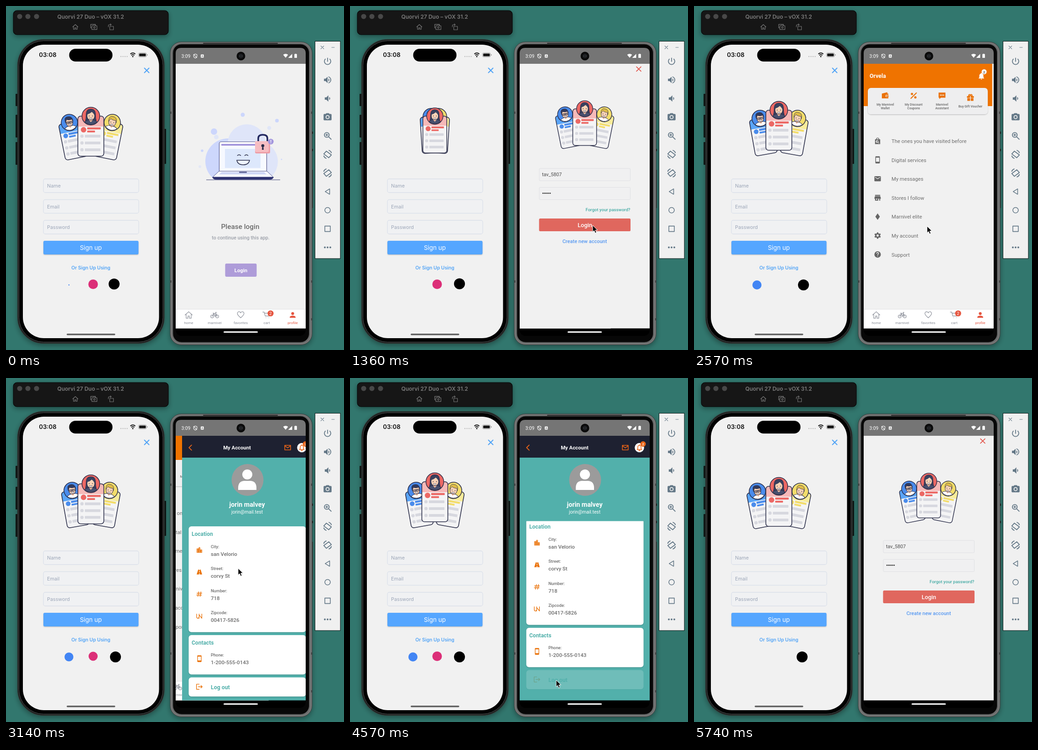
Recreate the animation shown at these times as an HTML page. Size 741x756 px, loop 5850 ms.

```html
<!DOCTYPE html>
<html lang="en">
<head>
<meta charset="utf-8">
<title>Two phones</title>
<style>
html, body { margin: 0; width: 100%; height: 100%; overflow: hidden; background: #32776e; }
svg { display: block; width: 741px; height: 756px; }
text { font-family: Roboto, sans-serif; }
.ios text { font-family: Inter, sans-serif; }
</style>
</head>
<body>
<svg id="stage" viewBox="0 0 741 756"></svg>
<script>
const LOOP = 5850, W = 285;
const NAVY = '#2b2e49', ORANGE = '#ea7209', TEAL = '#52b0ab', RED = '#e5553f', SLATE = '#647887';

// Icons on a 24 x 24 grid
const FILLED = {
  power: 'M13 3h-2v10h2zM17.8 5.2l-1.4 1.4A7 7 0 1 1 7.6 6.6L6.2 5.2A9 9 0 1 0 17.8 5.2z',
  loud: 'M3 9v6h4l5 5V4L7 9zM16.5 12A4.5 4.5 0 0 0 14 8v8a4.5 4.5 0 0 0 2.5-4zM14 3.2v2.1a7 7 0 0 1 0 13.4v2.1a9 9 0 0 0 0-17.6z',
  quiet: 'M18.5 12A4.5 4.5 0 0 0 16 8v8a4.5 4.5 0 0 0 2.5-4zM5 9v6h4l5 5V4L9 9z',
  camera: 'M9 2L7.2 4H4a2 2 0 0 0-2 2v12a2 2 0 0 0 2 2h16a2 2 0 0 0 2-2V6a2 2 0 0 0-2-2h-3.2L15 2zM12 7a5 5 0 1 1 0 10a5 5 0 1 1 0-10zM12 9a3 3 0 1 0 0 6a3 3 0 1 0 0-6z',
  person: 'M12 12a4 4 0 1 0 0-8a4 4 0 0 0 0 8zM12 14c-2.7 0-8 1.3-8 4v2h16v-2c0-2.7-5.3-4-8-4z',
  bell: 'M12 22a2 2 0 0 0 2-2h-4a2 2 0 0 0 2 2zM18 16v-5c0-3-1.6-5.6-4.5-6.3V4a1.5 1.5 0 0 0-3 0v.7C7.6 5.4 6 8 6 11v5l-2 2v1h16v-1z',
  mail: 'M4 4a2 2 0 0 0-2 2v12a2 2 0 0 0 2 2h16a2 2 0 0 0 2-2V6a2 2 0 0 0-2-2zM20 8l-8 5-8-5V6l8 5 8-5z',
  help: 'M12 2a10 10 0 1 0 0 20a10 10 0 0 0 0-20zM13 19h-2v-2h2zM15 11.3c-1.5 1.5-2 2-2 3.7h-2c0-2.3.5-2.9 2.4-4.6A2 2 0 1 0 10 9H8a4 4 0 1 1 7 2.3z',
  phone: 'M7 1a2 2 0 0 0-2 2v18a2 2 0 0 0 2 2h10a2 2 0 0 0 2-2V3a2 2 0 0 0-2-2zM7 5h10v13H7z',
  diamond: 'M12 2L19 12L12 22L5 12z',
  store: 'M4 3h16v3H4zM4 7h16l2 6v2h-2v6h-3v-6h-3v6H4v-6H2v-2zM7 15v3h4v-3z',
  bag: 'M7 7a5 5 0 0 1 10 0h3v15H4V7zM9 7h6a3 3 0 0 0-6 0zM11 10a4 4 0 1 0 2 7l3 3 1-1-3-3a4 4 0 0 0-3-6zM11 12a2 2 0 1 1 0 4a2 2 0 0 1 0-4z',
  wallet: 'M2 6l16-4v4h3v4h-8v6h8v4H2zM14.5 11.5h7.5v3.5h-7.5z',
  chat: 'M2 3h20v15H9l-5 4v-4H2zM6 9v3h3V9zM10.5 9v3h3V9zM15 9v3h3V9z',
  gift: 'M2 8h4a4 4 0 0 1 6-5a4 4 0 0 1 6 5h4v5h-9V8h-2v5H2zM3 14h8v8H3zM13 14h8v8h-8zM8 6h3a1.5 1.5 0 0 0-3 0zM13 6h3a1.5 1.5 0 0 0-3 0z',
  city: 'M15 11V5l-3-3-3 3v2H3v14h18V11zM5 9h2v2H5zM5 13h2v2H5zM5 17h2v2H5zM11 5h2v2h-2zM11 9h2v2h-2zM11 13h2v2h-2zM11 17h2v2h-2zM17 13h2v2h-2zM17 17h2v2h-2z',
  road: 'M8 4h3v3h2V4h3l5 16h-8v-4h-2v4H3zM11 9v4h2V9z',
  exit: 'M17 7l-1.4 1.4 2.6 2.6H8v2h10.2l-2.6 2.6L17 17l5-5zM4 5h8V3H4a2 2 0 0 0-2 2v14a2 2 0 0 0 2 2h8v-2H4z',
  wifi: 'M12 21L.5 7C7 1.5 17 1.5 23.5 7z',
  signal: 'M2 22H22V2z',
  battery: 'M9 2h6v2h3v18H6V4h3z',
  gear: 'M10 2h4l.5 3 2.5 1.4 2.8-1 2 3.4L19.5 11v2l2.3 2.2-2 3.4-2.8-1-2.5 1.4-.5 3h-4l-.5-3L7 17.6l-2.8 1-2-3.4L4.5 13v-2L2.2 8.8l2-3.4 2.8 1L9.5 5zM12 8.5a3.5 3.5 0 1 0 0 7a3.5 3.5 0 0 0 0-7z'
};
const LINES = {
  home: 'M2 12L12 3l10 9M5 10v11h5v-6h4v6h5V10',
  bike: 'M9 16a4 4 0 1 1-8 0a4 4 0 1 1 8 0zM23 16a4 4 0 1 1-8 0a4 4 0 1 1 8 0zM5 16l4-7h7l3 7M9 9l4 7 3-7-2-4h3M7 7h4',
  heart: 'M12 20C7 15.5 3 12 3 8.5A4.5 4.5 0 0 1 12 6.5A4.5 4.5 0 0 1 21 8.5C21 12 17 15.5 12 20z',
  cart: 'M1 4h4l3 11h11l3-8H6M10 19.5h.1M18 19.5h.1',
  zoom: 'M16 10a6 6 0 1 1-12 0a6 6 0 1 1 12 0zM14.5 14.5L21 21M7.5 10h5M10 7.5v5',
  turn: 'M9 4L21.5 13.5L15 20.5L2.5 11zM15.5 2Q20 3.500 21.5 8M8.500 22Q4 20.5 2.5 16',
  back: 'M18 4v16L5 12z',
  round: 'M20 12a8 8 0 1 1-16 0a8 8 0 1 1 16 0z',
  square: 'M4 4h16v16H4z',
  cross: 'M5 5L19 19M19 5L5 19',
  dash: 'M4 12h16',
  chevron: 'M16 4l-8 8 8 8',
  letter: 'M3 5h18v14H3zM3 6l9 7 9-7',
  bellLine: 'M5 18h14l-2-3v-5a5 5 0 0 0-10 0v5zM10 21h4M12 3v2',
  hash: 'M10 4L7 20M17 4l-3 16M4 9h16M3 15h16',
  zip: 'M3 5v9q0 5 4 5t4-5V5M11 19V8l9 11V5',
  percent: 'M4 20L20 4M9 7a2 2 0 1 1-4 0a2 2 0 1 1 4 0zM19 17a2 2 0 1 1-4 0a2 2 0 1 1 4 0z',
  shots: 'M1 3h17v4M1 3v12h4M5 8h4l1-2h6l1 2h6v13H5zM17 14a3 3 0 1 1-6 0a3 3 0 1 1 6 0z',
  rotate: 'M8 10h13v12H8zM3 12V8q0-4 5-4h5M10 1l3 3-3 3',
  shield: 'M12 2l8 3v7q0 7-8 10Q4 19 4 12V5zM5 4l14 16'
};

const rect = (x, y, w, h, fill, rx = 0, more = '') =>
  `<rect x="${x}" y="${y}" width="${w}" height="${h}" rx="${rx}" fill="${fill}" ${more}/>`;
const dot = (x, y, r, fill, more = '') => `<circle cx="${x}" cy="${y}" r="${r}" fill="${fill}" ${more}/>`;
const path = (d, fill, more = '') => `<path d="${d}" fill="${fill}" ${more}/>`;
const stroke = (d, color, w = 1, more = '') =>
  path(d, 'none', `stroke="${color}" stroke-width="${w}" ${more}`);
const text = (s, x, y, size, fill, weight = 400, anchor = 'middle') =>
  `<text x="${x}" y="${y}" font-size="${size}" fill="${fill}" font-weight="${weight}" text-anchor="${anchor}">${s}</text>`;
const left = (s, x, y, size, fill, weight) => text(s, x, y, size, fill, weight, 'start');
const group = (id, body, more = '') => `<g id="${id}" ${more}>${body}</g>`;
function icon(name, x, y, size, color, w = 2) {
  const k = size / 24;
  const shape = FILLED[name] ? path(FILLED[name], color, 'fill-rule="evenodd"')
    : stroke(LINES[name], color, w, 'stroke-linejoin="round" stroke-linecap="round"');
  return `<g transform="translate(${x - size / 2} ${y - size / 2}) scale(${k})">${shape}</g>`;
}

function face(r, color, hair, look) {
  const long = look === 'long', k = r / 19;
  return dot(0, 0, r, color, `stroke="${NAVY}" stroke-width="1.5"`) + `<g transform="scale(${k})">` +
    (long ? path('M-12 13Q-10 5-10-3Q-10-15 0-15T10-3Q10 5 12 13z', hair, `stroke="${NAVY}"`) : '') +
    path('M-13 13Q-12 9-4 8h8q8 1 9 5Q7 18 0 18T-13 13z', long ? '#47506f' : '#fff', `stroke="${NAVY}"`) +
    path('M-3.5 5h7v4L0 13L-3.5 9z', '#f5bfa0') +
    path('M-8-4Q-8-10 0-10T8-4V1Q7 8.500 0 8.500T-8 1z', '#fbd3b6', `stroke="${NAVY}"`) +
    (long ? path('M-9 2Q-10-13 0-13T9 2Q8-4 2-9Q-2-5-7-4z', hair)
      : path('M-9-1Q-11-13-3-14Q10-15 9-1L7-6Q-1-5-5-8z', hair, `stroke="${NAVY}" stroke-width=".8"`)) +
    (look === 'glasses' ? stroke('M-6.5-2h5.500v4h-5.500zM1-2h5.500v4H1zM-1-1h2', NAVY, 1.2) : '') +
    dot(-3.5, -.3, .9, NAVY) + dot(3.5, -.3, .9, NAVY) + path('M-3 4h6Q2 7 0 7T-3 4z', '#fff', `stroke="${NAVY}" stroke-width=".6"`) + '</g>';
}
function card(w, h, r, soft, strong, hair, look) {
  const x = -w / 2, rows = [.5, .67, .84];
  return rect(x, 0, w, h, '#f4f4f5', 6) + path(`M${x} ${h * .26}V6q0-6 6-6h${w - 12}q6 0 6 6V${h * .26}z`, soft) +
    dot(x + w * .22, h * .34, w * .105, strong) +
    rect(x + w * .36, h * .28, w * .52, 4.5, strong, 1) + rect(x + w * .36, h * .36, w * .3, 4, strong, 1) +
    rows.map(p => dot(x + w * .16, h * p, 3.6, '#d7d8df') + rect(x + w * .27, h * p - 3, w * .6, 6, '#d7d8df', 1)).join('') +
    rect(x, 0, w, h, 'none', 6, `stroke="${NAVY}" stroke-width="1.6"`) + face(r, strong, hair, look);
}
const fan = id =>
  group(id + 'L', card(49, 80, 18, '#5aa5f8', '#4a8cec', '#323a5c', 'glasses')) +
  group(id + 'R', card(49, 80, 18, '#f8ec9b', '#f3dd6b', '#e0bc49', 'plain')) +
  group(id + 'C', card(57, 88, 19.5, '#f6b9b8', '#ec6864', '#3a415f', 'long'));

const field = (y, label) => rect(82, y, 209, 30, '#f0f1f3', 4, 'stroke="#dce1ea" stroke-width="1.3"') +
  left(label, 90, y + 19, 10.8, '#9ca6b8');

const simBar = group('bar', rect(16, 10, 340, 53, '#121212', 8, 'stroke="#050505" filter="url(#shade)"') +
  [30, 48, 67].map(x => dot(x, 23, 5.6, '#484848')).join('') +
  text('Quorvi 27 Duo – vOX 31.2', 185.5, 27.5, 12, '#7c7c7c', 600) +
  icon('home', 152, 46, 14, '#777', 2) + icon('shots', 192.5, 46, 15, '#777', 1.8) +
  icon('rotate', 230, 46, 15, '#777', 1.8), 'class="ios"');

const iphone = group('ios',
  [193, 239, 299].map((y, i) => rect(21, y, 5, i ? 50 : 27, '#101816', 1)).join('') + rect(346, 270, 5, 77, '#101816', 1) +
  rect(25.5, 73.5, 321.5, 668, '#1c1c1c', 57, 'stroke="#2f3836" stroke-width="1.5" filter="url(#shade)"') +
  rect(28.5, 76.5, 315.5, 662, '#000', 54, 'stroke="#4c5151" stroke-width="1"') +
  rect(37, 85, 298.5, 645, '#f1f1f1', 46) + rect(138.5, 94, 95, 28, '#000', 14) +
  text('03:08', 91.5, 112.3, 13.2, '#111', 600) + [252, 256.5, 261, 265.5].map(x => dot(x, 111, 1.2, '#bbb')).join('') +
  stroke('M272.5 105.5q5.5-4.5 11 0M274.5 108.3q3.5-2.8 7 0', '#111', 1.9) + dot(278, 111, 1.5, '#111') +
  rect(290.5, 103, 17.5, 9, 'none', 2.8, 'stroke="#999"') + rect(292, 104.5, 14.5, 6, '#111', 1.5) + rect(309, 106, 1.5, 3, '#999', .7) +
  icon('cross', 308.5, 141.5, 17, '#52a4f6', 3) + fan('a') +
  field(380, 'Name') + field(425.5, 'Email') + field(471, 'Password') +
  rect(82, 516, 208.5, 30, '#54a6ff', 3, 'filter="url(#soft)"') + text('Sign up', 186, 536, 13.5, '#fff') +
  text('Or Sign Up Using', 186, 579.3, 10.4, '#52a4f6', 600) +
  ['#4285f4', '#dc2f78', '#000'].map((c, i) => dot(0, 0, 0, c, `id="s${i}"`)).join('') +
  rect(133, 720, 106.5, 3.5, '#626262', 1.8), 'class="ios"');

const TABS = [['home', 'home'], ['bike', 'marnivel'], ['heart', 'favorites'], ['cart', 'cart'], ['person', 'profile']];
const tabs = rect(372, 666, W, 43, '#fff') + rect(372, 666, W, 1, '#e2e2e4') +
  TABS.map(([name, label], i) => {
    const x = 400.5 + i * 57, c = i === 4 ? RED : '#8b8f99';
    return icon(name, x, 679, 19, c, 1.5) + text(label, x, 699, 8, c);
  }).join('') + dot(580, 675.5, 6.6, RED) + text('2', 580, 679, 9.5, '#fff');

const laptop = `<g clip-path="url(#ground)">` + dot(487, 341, 50, '#cdd7fc') + dot(528, 302, 42, '#dfe5f9') + dot(551, 342, 45, '#dfe5f9') + '</g>' +
  dot(519, 239, 4.5, '#ccd6fc') + dot(456, 276, 7, '#ccd6fc') + dot(594, 252, 4, '#ccd6fc') + dot(430, 318, 2.8, '#ccd6fc') +
  dot(577, 268, 4.3, '#e0e6f8') + dot(461, 288, 5, '#e0e6f8') + dot(425, 353, 3, '#e4e8f6') + dot(604, 337, 1.5, '#ccd6fc') +
  rect(467.5, 298.5, 104, 68, '#fff', 4, 'stroke="#53568c" stroke-width="1.2"') + rect(472, 303, 95, 4, '#a497dd', 1) +
  rect(472, 308, 95, 55, '#f6f9ff') + rect(480, 314, 78, 42, '#dde8fc') +
  stroke('M507 329q4-4 8 0M523 329q4-4 8 0', NAVY, 1.5) + path('M506 339h28q-2 10-14 10t-14-10z', '#eef4ff', `stroke="${NAVY}" stroke-width="1.4"`) +
  path('M467 363h105l14 13H453z', '#f7f8ff', 'stroke="#53568c"') + path('M473 365h93l5 5H467z', '#cfd6f5') + rect(511, 364, 17, 3, '#666b9c', 1) +
  path('M452 376h135q-2 5-8 5.5H460q-6-.5-8-5.5z', '#2d3170') + rect(439, 381.5, 162, 1, '#3b3f73') +
  stroke('M553 298v-7q0-8 10-8t10 8v7', '#23285f', 3.6) + rect(546, 297, 33, 27, '#ed9da6', 3) + rect(546, 297, 30, 24, '#f6bdc2', 3) +
  dot(563, 307, 3.3, NAVY) + path('M562 307h2l1 9h-4z', NAVY) + dot(580.5, 298, 6.2, '#a497dd') + text('!', 580.5, 302, 10, '#fff', 700);

const welcome = group('welcome', rect(372, 127, W, 582, '#f1f1f1') + laptop +
  text('Please login', 513.5, 490, 15.3, '#6b6b6b', 500) + text('to continue using this app.', 514.5, 513, 10.7, '#9ca0a9', 500) +
  rect(480.5, 566, 69, 29, '#ae9cd9', 3) + text('Login', 515, 584.7, 11.3, '#fff', 700) + tabs);

const box = y => rect(415, y, 199.5, 27, '#f0f0f1', 2, 'stroke="#dfe0e3"');
const login = group('login', rect(372, 127, W, 582, '#f1f1f1') + icon('cross', 633, 138.5, 17, '#e2564d', 2.4) + fan('b') +
  box(357) + left('tav_5807', 421, 374.3, 10.7, '#4c4c4c') + box(398.5) +
  [0, 1, 2, 3, 4, 5].map(i => dot(423 + i * 3.2, 411.5, 1.2, '#222')).join('') +
  text('Forgot your password?', 614.5, 451, 9.6, '#43aaa4', 500, 'end') +
  group('submit', rect(414.5, 467, 200.5, 28, '#e0675e', 2.5) + text('Login', 515, 486, 12.8, '#fff', 500)) +
  text('Create new account', 514.5, 520.7, 11, '#5799f2', 500));

const QUICK = [['wallet', 'My Marnivel', 'Wallet'], ['percent', 'My Discount', 'Coupons'], ['chat', 'Marnivel', 'Assistant'], ['gift', 'Buy Gift Voucher']];
const MENU = [['bag', 'The ones you have visited before'], ['phone', 'Digital services'], ['mail', 'My messages'],
  ['store', 'Stores I follow'], ['diamond', 'Marnivel elite'], ['gear', 'My account'], ['help', 'Support']];
const menu = group('menu', rect(372, 127, W, 582, '#f1f1f1') + rect(372, 127, W, 93, '#ef7300') + left('Orvela', 386, 158, 12.3, '#fff', 700) +
  icon('bell', 631, 154, 18, '#fff') + dot(637, 144.5, 5.5, '#fff') + text('2', 637, 147.5, 8, '#444', 500) +
  rect(382, 180, 263, 58, '#eeeeef', 7, 'filter="url(#soft)"') +
  QUICK.map(([name, a, b], i) => {
    const x = 420.3 + i * 62.2;
    return icon(name, x, b ? 197 : 201, 18, ORANGE, 2.8) + text(a, x, b ? 219 : 223, 7, '#666', 500) + (b ? text(b, x, 227, 7, '#666', 500) : '');
  }).join('') +
  MENU.map(([name, label], i) => icon(name, 403.5, 296.5 + i * 41.6, 17, '#666') +
    left(label, 434, 301 + i * 41.6, 11.3, '#6d6d6d')).join('') + tabs);

const entry = (name, label, value, y) => icon(name, 410, y + 8, 16, ORANGE, 2) +
  left(label, 435, y + 3.5, 9.3, '#6d6d6d', 500) + left(value, 435, y + 20.5, 11.5, '#6d6d6d', 500);
const panel = (y, h) => rect(386.5, y, 257, h, '#fff', 6, 'filter="url(#soft)"');
const account = group('account', rect(372, 127, W, 582, TEAL) +
  `<g clip-path="url(#list)">` + group('scroll',
    panel(310, 232.5) + left('Location', 393, 330.5, 12, TEAL, 700) +
    entry('city', 'City:', 'san Velorio', 354) + entry('road', 'Street:', 'corvy St', 402.3) +
    entry('hash', 'Number:', '718', 451) + entry('zip', 'Zipcode:', '00417-5826', 499.3) +
    panel(549, 86.5) + left('Contacts', 393, 569.5, 12, TEAL, 700) + entry('phone', 'Phone:', '1-200-555-0143', 592.8) +
    group('logout', panel(642, 42) + rect(393, 643, 35, 40, '#fff') + icon('exit', 410, 662.5, 17, ORANGE) + left('Log out', 435, 668, 12.3, TEAL, 700))) + '</g>' +
  rect(372, 127, W, 48, '#1e2131') + icon('chevron', 390, 153, 17, '#ea6417', 2.5) + text('My Account', 492.5, 157.3, 11.3, '#fff', 700) +
  icon('letter', 603.5, 153, 17, '#ea6417', 2.2) + dot(634.5, 153, 10.3, '#fff') + icon('bellLine', 634.5, 153, 17, '#ea6417', 2.2) +
  dot(642.5, 145, 6, '#ea6417') + text('2', 642.5, 148, 8, '#fff', 500) +
  dot(515.5, 224, 35, '#9b9b9b') + dot(515, 212, 11, '#fff') + path('M495 246v-6q1-14 14-14h12q13 0 14 14v6z', '#fff') +
  text('jorin malvey', 514.5, 283.3, 14.3, '#fff', 700) + text('jorin@mail.test', 514.5, 297.7, 10.3, '#fff'));

const android = rect(360, 79, 311, 665.5, '#6d6e6e', 24, 'stroke="#3a3d3c" filter="url(#shade)"') +
  rect(362, 81, 307, 661.5, 'none', 22, 'stroke="#838484"') + rect(366, 84, 298.5, 655, '#070707', 19, 'stroke="#3c3c3c"') +
  rect(432, 81, 164, 2, '#262626', 1) + [[360, 232], [360, 603], [669, 232], [669, 603], [669, 686]].map(([x, y]) => rect(x, y, 2.5, 5, '#3e4040')).join('') +
  rect(671, 276, 2, 5, '#222') + rect(671, 314, 2, 5, '#222') + rect(671, 360, 2, 84, '#333a38') +
  rect(372, 92, W, 633, '#000', 13) + path('M372 127V104q0-12 12-12h261q12 0 12 12v23z', '#757575') +
  left('3:09', 384.5, 113.5, 10.3, '#fff') + icon('shield', 415, 110, 11, '#fff', 2.3) + rect(427, 106.5, 6.5, 7, '#fff', 1) + text('A', 430.3, 112.3, 6, '#757575', 700) +
  dot(515, 110, 9.5, '#0a0a0a') + dot(515, 110, 5, '#1d1f22') + dot(512.5, 110, .8, '#555') + dot(517.5, 110, .8, '#555') +
  icon('wifi', 613, 109.5, 11, '#fff') + icon('signal', 623, 109.5, 10.5, '#fff') + icon('battery', 635, 109.5, 11, '#fff') +
  `<g clip-path="url(#screen)">${welcome}${menu}${account}${login}</g>` + rect(477, 715, 75, 3, '#fff', 1.5);

const TOOLS = ['power', 'loud', 'quiet', 'camera', 'zoom', 'turn', 'turn', 'back', 'round', 'square'];
const tools = rect(677.5, 77.5, 55.5, 477.5, '#f0f0f0', 0, 'stroke="#0b1514"') +
  icon('cross', 693.5, 91, 11, SLATE, 2.5) + icon('dash', 717, 91, 9, SLATE, 2.5) +
  TOOLS.map((name, i) => {
    const y = 121.5 + i * 40.9, flip = i === 6 ? `transform="translate(1410 0) scale(-1 1)"` : '';
    return `<g ${flip}>${icon(name, 705, y, i > 6 ? 18 : 21, SLATE, 2.1)}</g>`;
  }).join('') + [699, 705, 711].map(x => dot(x, 530.5, 2, SLATE)).join('');

const clip = (id, x, y, w, h) => `<clipPath id="${id}">${rect(x, y, w, h, '#000')}</clipPath>`;
const shadow = (id, dy, blur, a) => `<filter id="${id}" x="-10%" y="-20%" width="120%" height="150%">` +
  `<feDropShadow dx="0" dy="${dy}" stdDeviation="${blur}" flood-opacity="${a}"/></filter>`;

const stage = document.getElementById('stage');
stage.innerHTML = '<defs>' + clip('screen', 372, 127, W, 581.5) + clip('list', 372, 314.5, W, 395) + clip('ground', 420, 250, 200, 132) +
  shadow('shade', 4, 6, .35) + shadow('soft', 1, 1.3, .25) + '</defs>' + rect(0, 0, 741, 756, '#32776e') +
  simBar + iphone + android + tools +
  group('cursor', path('M0 0V14.5L3.3 11.5L5.6 17L8.2 16L5.9 10.5H10.5z', '#000', 'stroke="#fff" stroke-width="1"'));

const $ = id => document.getElementById(id);
const move = (id, x, y, more = '') => $(id).setAttribute('transform', `translate(${x} ${y}) ${more}`);
const push = (t, start, span = 550) => 1 - (1 - Math.min(1, Math.max(0, (t - start) / span))) ** 4;

// Eased value at time t from [time, value] steps
function track(t, steps) {
  const i = steps.findIndex(s => s[0] > t);
  if (i < 0) return steps[steps.length - 1][1];
  if (!i) return steps[0][1];
  const [t0, a] = steps[i - 1], [t1, b] = steps[i];
  return a + (b - a) * (1 - Math.cos(Math.PI * (t - t0) / (t1 - t0))) / 2;
}
function setFan(id, x, midY, sideY, spread, k, midK = 1) {
  const tilt = 2 + spread * .2, dx = spread * k;
  move(id + 'L', x - dx, sideY, `rotate(${-tilt}) scale(${k})`);
  move(id + 'R', x + dx, sideY, `rotate(${tilt}) scale(${k})`);
  move(id + 'C', x, midY, `scale(${k * midK})`);
}
function page(id, x, shown) {
  move(id, x, 0);
  $(id).style.display = shown && x < W ? '' : 'none';
}

const FAN = {
  mid: [[0, 242], [450, 231], [900, 240], [1360, 242], [2000, 242], [2570, 229], [2950, 237], [3300, 229], [3640, 236], [4000, 229], [4300, 237], [4570, 228], [5050, 238], [5400, 230], [5740, 238], [LOOP, 242]],
  side: [[0, 256], [950, 254], [1360, 243], [1800, 256], [2000, 256], [2570, 247], [4570, 247], [5740, 249], [LOOP, 256]],
  spread: [[0, 47], [950, 47], [1300, 8], [1400, 8], [1800, 47], [2000, 47], [2570, 41], [4570, 41], [5740, 47]],
  size: [[950, 1], [1300, .92], [1400, .92], [1800, 1]]
};
const FAN2 = {
  mid: [[300, 219], [900, 219], [1360, 226], [2000, 219], [2500, 226], [4700, 219], [5250, 219], [5740, 227]],
  side: [[1360, 238], [2000, 239], [4700, 239], [5740, 243]]
};
const SOCIAL = [
  { x: 138, y: 613, r: 10, steps: [[0, .12], [100, 0], [1400, 0], [1800, 1], [3100, 1], [3500, 0], [3600, .2], [3640, .35], [3900, 1], [4900, 1], [5300, 0], [5740, 0], [LOOP, .12]] },
  { x: 191, y: 611.5, r: 10.5, steps: [[0, 1], [2100, 1], [2450, 0], [2800, 0], [3200, 1], [5000, 1], [5500, 0], [5750, 0], [LOOP, 1]] },
  { x: 240, y: 613, r: 12, steps: [[0, 1]] }
];
const POINTER = {
  x: [[300, 520], [1000, 532], [1360, 532], [1900, 511], [2570, 511], [2750, 478], [2900, 478], [3300, 525], [3700, 525], [4350, 452]],
  y: [[300, 575], [1000, 482], [1360, 482], [1900, 484], [2570, 484], [2750, 500], [2900, 500], [3300, 376], [3700, 376], [4350, 664]]
};

function draw(t) {
  const at = steps => track(t, steps);
  setFan('a', 186, at(FAN.mid), at(FAN.side), at(FAN.spread), 1, at(FAN.size));
  setFan('b', 514.5, at(FAN2.mid), at(FAN2.side), 47, .915);

  SOCIAL.forEach(({ x, y, r, steps }, i) => {
    const sway = i < 2 ? 0 : at([[0, -3], [700, 0], [5200, 0], [5740, -3]]);
    const rise = i < 2 ? 0 : at([[0, -2], [1360, -2.5], [2000, 0], [5740, 0], [LOOP, -2]]);
    move('s' + i, x + sway, y + rise);
    $('s' + i).setAttribute('r', r * at(steps));
  });

  const opened = push(t, 70), entered = push(t, 2200), detail = push(t, 2850), closed = push(t, 4700);
  page('welcome', -.3 * W * opened, t < 2200);
  page('menu', -.3 * W * (1 - entered + detail), t >= 2200 && t < 3400);
  page('account', W * (1 - detail) - .3 * W * closed, t < 5250);
  page('login', W * (1 - opened + entered - closed), true);

  $('submit').style.opacity = at([[2020, 1], [2100, .55], [2180, .55], [2350, 1]]);
  $('logout').style.opacity = at([[4420, 1], [4550, .17], [4620, .17], [4800, 1]]);
  const stretch = at([[3380, 1], [3540, 1.02], [3640, 1.012], [3850, 1]]);
  const offset = at([[3250, 16], [3500, 0]]);
  move('scroll', 0, 664 + offset, `scale(1 ${stretch}) translate(0 -664)`);

  move('cursor', at(POINTER.x), at(POINTER.y));
  $('cursor').style.display = t > 300 && t < 5150 ? '' : 'none';
}

const start = performance.now();
function tick() {
  draw((performance.now() - start) % LOOP);
  requestAnimationFrame(tick);
}
tick();
</script>
</body>
</html>
```
